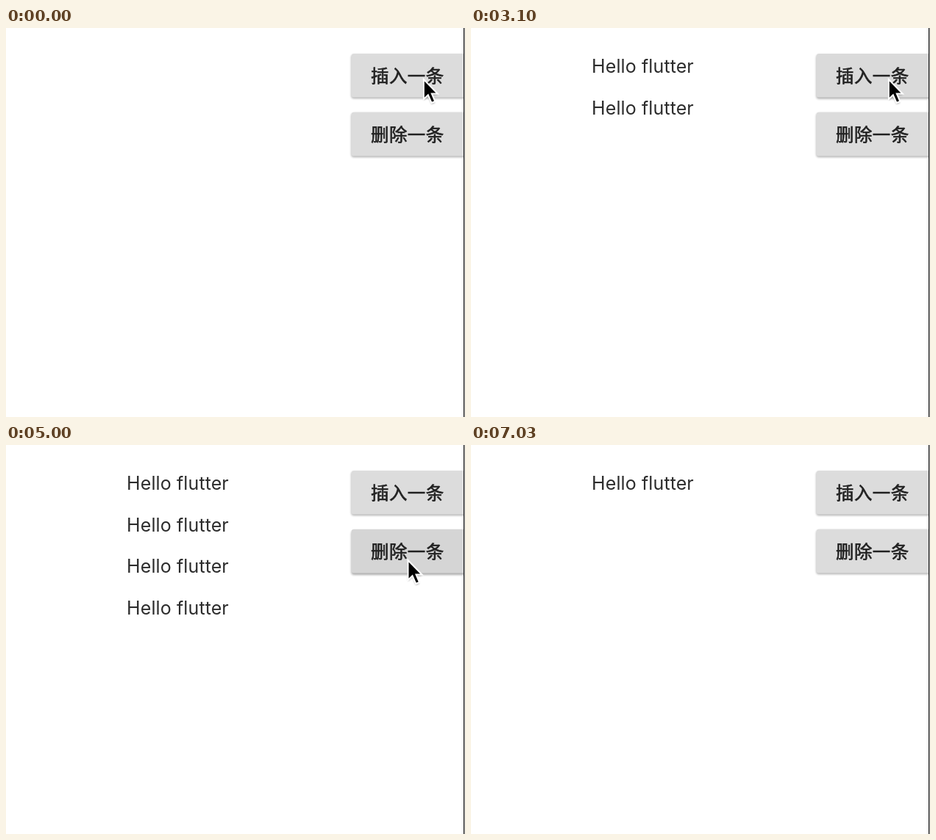
Recreate the animation shown at these times as an HTML page. Size 624x530 px, loop 7.76 s.

```html
<!DOCTYPE html>
<html lang="zh">
<head>
<meta charset="utf-8">
<title>Animated list</title>
<style>
  html, body { margin: 0; width: 100%; height: 100%; overflow: hidden; background: #fff; }
  svg { display: block; width: 624px; height: 530px; }
  .row { font: 400 25px Inter, Roboto, sans-serif; letter-spacing: .1px; fill: #2c2c2c; }
  .label {
    font: 500 24.4px "Noto Sans CJK SC", "Noto Sans CJK", sans-serif; letter-spacing: .5px;
    fill: #222; stroke: #222; stroke-width: .65px;
  }
</style>
</head>
<body>
<svg id="stage" viewBox="0 0 624 530" xmlns="http://www.w3.org/2000/svg">
  <defs>
    <clipPath id="screen"><rect width="622" height="530"/></clipPath>
    <filter id="blur" x="-20%" y="-40%" width="140%" height="180%"><feGaussianBlur stdDeviation="1.6"/></filter>
    <filter id="soft" x="-50%" y="-50%" width="200%" height="200%"><feGaussianBlur stdDeviation="1.3"/></filter>
  </defs>
  <rect width="624" height="530" fill="#fff"/>
  <g clip-path="url(#screen)">
    <g id="list"></g>
    <g id="buttons"></g>
  </g>
  <rect x="622" width="1.3" height="530" fill="#111"/>
  <g id="cursor">
    <path d="M0 0V27L6 21.3 10.7 32 15.5 30 11 19.5H19Z" transform="translate(0 2)" fill="#000" opacity=".3" filter="url(#soft)"/>
    <path d="M0 0V27L6 21.3 10.7 32 15.5 30 11 19.5H19Z" fill="#000" stroke="#fff" stroke-width="2"/>
  </g>
</svg>
<script>
const LOOP = 7760, SLIDE = 300, LIST_W = 466, ROW_H = 56.6, MAX_ROWS = 4;
const NS = 'http://www.w3.org/2000/svg';
const $ = id => document.getElementById(id);
const clamp = v => Math.max(0, Math.min(1, v));

// press: pointer down, start: list operation begins
const inserts = [[1470, 1600], [2330, 2470], [3100, 3270], [3930, 4068]]
  .map(([press, start]) => ({ press, start }));
const removals = [[4970, 5100], [5830, 5970], [6650, 6730]]
  .map(([press, start]) => ({ press, start }));

function add(parent, tag, attrs, text = '') {
  const el = document.createElementNS(NS, tag);
  for (const key in attrs) el.setAttribute(key, attrs[key]);
  el.textContent = text;
  return parent.appendChild(el);
}

const rows = Array.from({ length: MAX_ROWS }, (_, i) => add($('list'), 'text', {
  class: 'row', x: LIST_W / 2 + .5, y: 61 + i * ROW_H, 'text-anchor': 'middle'
}, 'Hello flutter'));

function makeButton(y, label) {
  const box = { x: 469.5, y, width: 160, height: 59.6, rx: 3.5 };
  const shadow = add($('buttons'), 'rect', { ...box, fill: '#000', opacity: .32, filter: 'url(#blur)' });
  const face = add($('buttons'), 'rect', box);
  add($('buttons'), 'text', { class: 'label', x: 496, y: y + 39 }, label);
  return { shadow, face };
}
const insertButton = makeButton(35, '插入一条');
const removeButton = makeButton(114.8, '删除一条');

function pressure(taps, t) {
  return Math.max(...taps.map(({ press, start }) =>
    t < press ? 0 : clamp((t - press + 10) / 100) * (1 - clamp((t - start) / 180))));
}

function paintButton({ shadow, face }, p) {
  const grey = Math.round(220 - 16 * p);
  face.setAttribute('fill', `rgb(${grey},${grey},${grey})`);
  shadow.setAttribute('transform', `translate(0 ${1.5 + 2.5 * p})`);
}

function paintList(t) {
  const count = inserts.filter(o => t >= o.start).length
    - removals.filter(o => t >= o.start + SLIDE).length;
  const active = o => t >= o.start && t < o.start + SLIDE;
  const entering = inserts.find(active), leaving = removals.find(active);
  let shift = 0;
  if (entering) shift = (t - entering.start) / SLIDE - 1;
  if (leaving) shift = -(t - leaving.start) / SLIDE;
  rows.forEach((row, i) => {
    row.setAttribute('visibility', i < count ? 'visible' : 'hidden');
    row.setAttribute('transform', `translate(${i ? 0 : shift * LIST_W} 0)`);
  });
}

function paintCursor(t) {
  const k = clamp((t - 4380) / 250), e = k * k * (3 - 2 * k);
  $('cursor').setAttribute('transform', `translate(${567.8 - 21.3 * e} ${70 + 87 * e})`);
  $('cursor').setAttribute('visibility', t < 7030 ? 'visible' : 'hidden');
}

function draw(t) {
  paintList(t);
  paintButton(insertButton, pressure(inserts, t));
  paintButton(removeButton, pressure(removals, t));
  paintCursor(t);
}

const begin = performance.now();
function tick() {
  draw((performance.now() - begin) % LOOP);
  requestAnimationFrame(tick);
}
tick();
</script>
</body>
</html>
```
